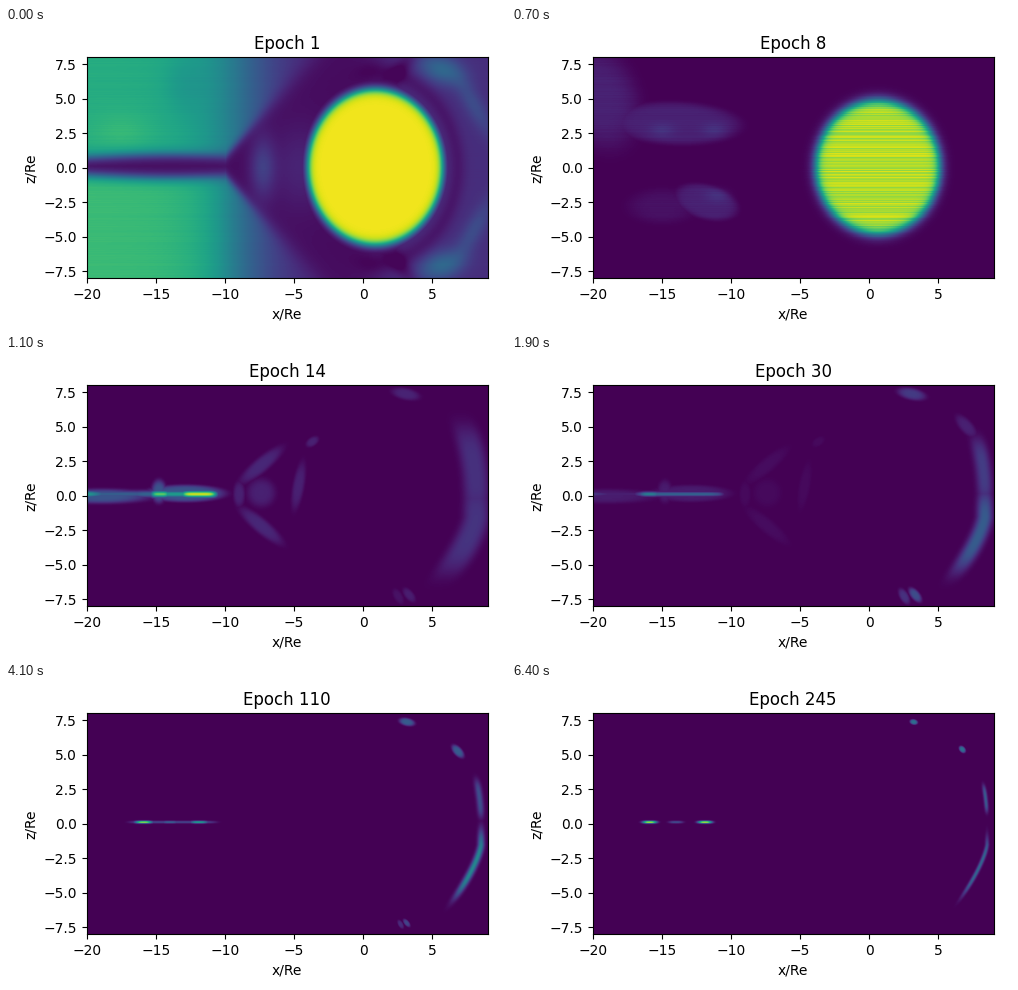
Write a matplotlib script that moves like this. It is 500 by 300 pixels and loops after 6.5 s.

```python
import numpy as np
import matplotlib.pyplot as plt
from matplotlib.animation import FuncAnimation

FRAMES, STEP = 65, 100
NX, NZ = 401, 221
xs = (-20 + (np.arange(NX) + 0.5) * 29 / NX)[None, :]
zs = (8 - (np.arange(NZ) + 0.5) * 16 / NZ)[:, None]

# the shown epochs get sparser: the step grows by one every ten frames
epochs = np.cumsum([1] + [1 + i // 10 for i in range(1, FRAMES)])
rows = np.random.default_rng(7).random((NZ, 1))


def lerp(a, b, t):
    return a + (b - a) * min(max(t, 0), 1)


def sigmoid(u):
    return 1 / (1 + np.exp(-np.clip(u, -40, 40)))


def patch(x, z, rx, rz, deg=0, power=2):
    """Tilted elliptic bump; a higher power gives a flatter top."""
    a = np.radians(deg)
    dx, dz = xs - x, zs - z
    u = (dx * np.cos(a) + dz * np.sin(a)) / rx
    v = (dz * np.cos(a) - dx * np.sin(a)) / rz
    return np.exp(-(u * u + v * v) ** power)


def soft(x, z, rx, rz, deg=0):
    return patch(x, z, rx, rz, deg, 1)


def plateau(u, power=4):
    return np.exp(-np.abs(u) ** power)


def blend(layers):
    return np.maximum.reduce(list(layers))


def opening():
    """Lobes, dark current sheet and surroundings of the first epoch."""
    lobes = .1 + .52 * sigmoid(-(xs + 8.8) / 1.7) + .04 * sigmoid(xs - 4)
    lobes = lobes + .06 * sigmoid(-3 * zs) * sigmoid(-2 * (xs + 10))
    lobes = lobes + .05 * soft(-17.5, 2.6, 2.2, 1.4) - .05 * soft(-13, 6, 1.5, 2)
    half = .7 + .15 * np.sin(xs / 3) * (xs < -10) + 1.1 * np.maximum(xs + 10, 0)
    outside = sigmoid((np.abs(zs - .1) - half) / (.22 + .4 * sigmoid(xs + 7)))
    inside = (.03 + .07 * soft(-4.6, 0, 2, 3) + .15 * soft(-7.3, 0, .9, 2.2)
              + .1 * sigmoid(1.5 * (xs - 1)))
    out = lobes * outside + inside * (1 - outside)
    ring = np.hypot((xs - .8) / 4.8, zs / 5.55)
    out -= .07 * np.exp(-((ring - 1.25) / .13) ** 2) * sigmoid(2 * xs)
    for side in (1, -1):
        out += .2 * soft(5.6, 7.1 * side, 1.7, 1, -20 * side)
        out += .1 * soft(8, 4.5 * side, 2.5, .7, -60 * side)
        out -= .1 * soft(2.6, 7 * side, 1.8, .6, 50 * side)
    return np.clip(out * (.99 + .02 * rows), .015, 1)


def haze():
    """Faint remains of the lobes."""
    upper = blend([patch(-14, 3.2, 4.6, 1.5, -2, 4), patch(-19.5, 5, 2.6, 3.6, 20)])
    lower = patch(-11.8, -2.5, 2.3, 1.2, -15, 4)
    cores = blend(soft(x, z, .9, .5) for x, z in [(-11.2, 2.7), (-15, 2.7), (-11, -2)])
    return (.1 * blend([upper, lower, .5 * patch(-15, -2.8, 2.4, 1.2)])
            + .06 * cores) * (1 - .15 * rows)


def wisps():
    """Halo of the sheet and the wings that open behind it."""
    wings = blend(patch(-7.4, 2.2 * s, 1.9, .5, 40 * s) for s in (1, -1))
    middle = blend([patch(-7.4, .2, 1, 1), patch(-9, .1, .4, .9),
                    patch(-4.7, .7, 1.7, .4, 80), patch(-3.7, 3.9, .5, .3, 35)])
    halo = blend([patch(-12.9, .15, 2.8, .6, 0, 3), patch(-14.8, .3, .5, .8),
                  patch(-19, -.05, 3.4, .5)])
    return blend([.11 * wings, .09 * middle, .26 * halo])


def disc(i):
    k = i / 7
    rho = np.hypot((xs - lerp(.85, .6, k)) / lerp(4.9, 4.5, k),
                   (zs - .03) / lerp(5.65, 4.85, k))
    level = lerp(.98, .95, k) * lerp(1, 0, (i - 7) / 4)
    return level * sigmoid((1 - rho) / lerp(.035, .045, k)) * (1 - .13 * min(k, 1) * rows)


def sheet(u):
    """Hot line at z = 0 that breaks into three short cores."""
    early = max(1 - u, 0) ** 4
    size = .9 - .4 * u
    rise = min(1, 2 * u)
    levels = (.75 + .17 * u, .5 - .27 * u, .35 + .57 * u ** 3)
    cores = blend(v * plateau((xs - x) / size, 3)
                  for x, v in zip((-15.9, -14, -11.9), levels))
    start = blend([.55 * plateau((xs + 20.2) / 1.6, 2), .3 * plateau((xs + 18) / 3),
                   .75 * plateau((xs + 14.7) / .7),
                   .92 * plateau((xs + 11.9) / 1.3, 6),
                   .55 * plateau((xs + 13) / 2.4, 8)])
    base = .32 * (1 - u ** 3) * plateau((xs + 13.8) / 3.1, 10)
    line = blend([early * start, rise * cores, base])
    return line * np.exp(-((zs - .1) / lerp(.24, .09, 2 * u)) ** 2)


bow_x = 8.5 - .033 * np.maximum(zs, 0) ** 2 - .28 * np.maximum(-zs - 1.5, 0) ** 1.4
bow_len = np.hypot(1, np.gradient(bow_x[:, 0], zs[:, 0]))[:, None]


def bow(u):
    """Crescent on the right that thins out to two arcs."""
    upper = (.14 + .14 * u) * plateau((zs - 1.8) / (3.2 * .3 ** u))
    glow = .15 + .17 * u + .2 * np.sin(np.pi * u ** 1.4)
    lower = glow * plateau((zs + 2.4 + .7 * u) / (3.2 - 1.1 * u))
    shift = lerp(-.35, 0, 2 * u)
    across = (xs - bow_x - shift) / (bow_len * .9 * .15 ** u)
    return blend([upper, lower]) * plateau(across, lerp(3, 2, 2 * u))


def spots(u):
    """Small patches near the corners, shrinking in place."""
    s = min(1, 3.4 * .08 ** u)
    level = .1 + .26 * u
    sinking = .08 * (1 - u) + .9 * u * (1 - u)
    return blend([
        level * min(1, 2 * u) * patch(6.6 + .4 * s, 5.5 - .5 * s, s, .1 + .33 * s, -48),
        level * patch(3.25 - .2 * s, 7.35, s, .1 + .3 * s, -12),
        sinking * patch(2.9 + .4 * s, -7.2, .6 * s, .3 * s, -50),
        sinking * .6 * patch(2.9 - .4 * s, -7.3, .6 * s, .3 * s, -60)])


first, faint, wings = opening(), haze(), wisps()


def field(i):
    layers = [np.zeros((NZ, NX))]
    if i < 11:
        layers.append(first * np.exp(-i / 2.4) * lerp(1, 0, i / 7))
        layers.append(faint * np.interp(i, [0, 7, 10], [0, 1, 0]))
        layers.append(disc(i))
    if i > 7:
        gain = lerp(0, 1, (i - 7) / 4)
        u = max(0, np.log(epochs[i] / epochs[11]) / np.log(epochs[-1] / epochs[11]))
        layers.append(gain * (1 - u) ** 4 * wings)
        layers += [gain * part(u) for part in (sheet, bow, spots)]
    return blend(layers)


fig = plt.figure(figsize=(5, 3), dpi=100)
ax = fig.add_axes([80.7 / 500, 49.62 / 300, 401 / 500, 221 / 300])
image = ax.imshow(first, cmap="viridis", vmin=0, vmax=1, aspect="auto",
                  extent=(-20, 9, -8, 8), interpolation="nearest")
ax.set_xticks(range(-20, 6, 5))
ax.set_yticks(np.arange(-7.5, 8, 2.5))
ax.set_xlabel("x/Re")
ax.set_ylabel("z/Re")
title = ax.set_title("Epoch 1")


def update(i):
    image.set_data(field(i))
    title.set_text(f"Epoch {epochs[i]}")
    return image, title


anim = FuncAnimation(fig, update, frames=FRAMES, interval=STEP,
                     repeat=True, repeat_delay=0)
plt.show()
```
